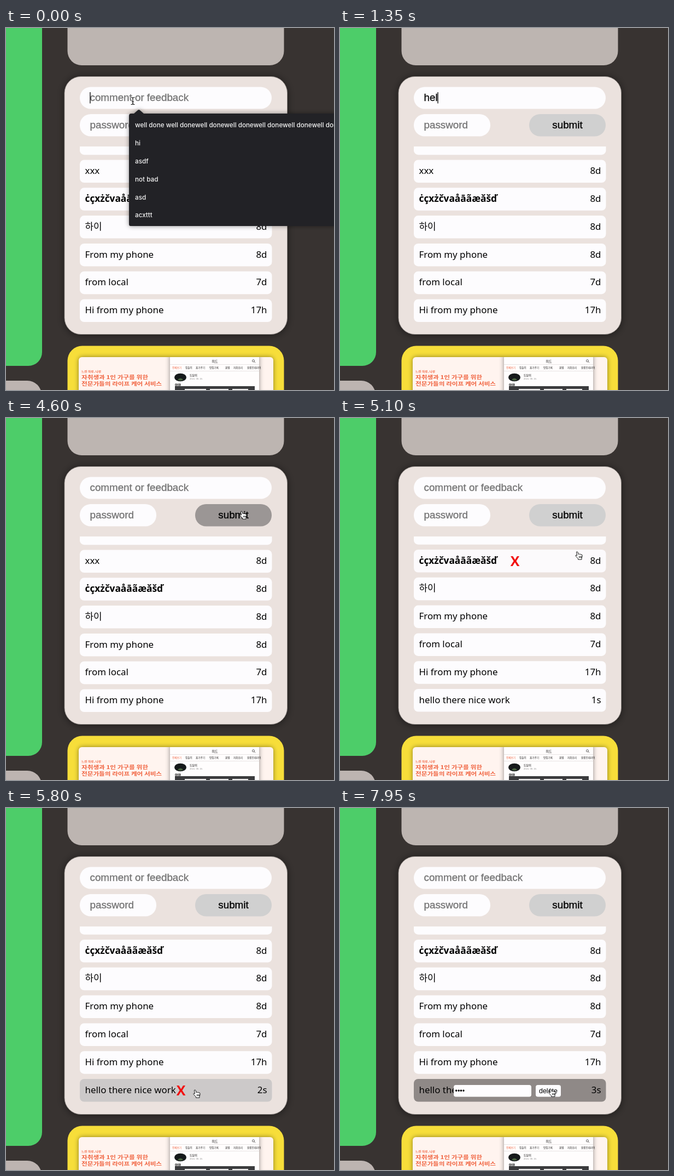
An HTML page for the animation above (8000 ms loop, 600 by 660 pixels).

```html
<!DOCTYPE html>
<html lang="en">
<head>
<meta charset="utf-8">
<title>Comment box</title>
<style>
  html, body { margin: 0; width: 100%; height: 100%; overflow: hidden; background: #383331; }
  svg { display: block; width: 100vw; height: 100vh; }
  text { white-space: pre; }
  .form { font: 18.8px "Liberation Sans", Arial, sans-serif; }
  .list { font: 16.9px "Noto Sans", "Noto Sans CJK KR", "Noto Sans CJK", sans-serif; }
  .menu { font: 500 11.7px Inter, sans-serif; fill: #f4f4f4; }
  .small { font: 12.5px "Liberation Sans", Arial, sans-serif; }
  .shot { font-family: "Noto Sans CJK KR", "Noto Sans CJK", sans-serif; }
</style>
</head>
<body>
<svg viewBox="0 0 600 660" preserveAspectRatio="none">
  <defs>
    <clipPath id="listClip"><rect x="130" y="216" width="362" height="326"/></clipPath>
    <clipPath id="shotClip"><rect x="133" y="600" width="356" height="90" rx="6"/></clipPath>
    <filter id="shadow" x="-20%" y="-20%" width="140%" height="140%">
      <feDropShadow dx="0" dy="1" stdDeviation="7" flood-color="#000" flood-opacity=".5"/>
    </filter>
    <filter id="soft" x="-20%" y="-40%" width="140%" height="180%">
      <feDropShadow dx="0" dy="0" stdDeviation="4" flood-color="#000" flood-opacity=".45"/>
    </filter>
    <path id="ibeam" d="M-3-6.500q3 0 3 2q0-2 3-2M0-4.500V4.500M-3 6.500q3 0 3-2q0 2 3 2M-1.500 1.500h3"/>
  </defs>

  <rect width="600" height="660" fill="#383331"/>
  <rect x="-60" y="-60" width="126" height="676" rx="25" fill="#4dcd69"/>
  <rect x="-60" y="643" width="125" height="80" rx="26" fill="#bdb4b1"/>
  <rect x="112.500" y="-60" width="396" height="128" rx="26" fill="#bdb5b1"/>

  <g class="shot">
    <rect x="112.500" y="579.500" width="396" height="140" rx="27" fill="#f7de3a"/>
    <rect x="133" y="600" width="356" height="90" rx="6" fill="#fff4ef" filter="url(#soft)"/>
    <g clip-path="url(#shotClip)">
      <rect x="300" y="596" width="163" height="90" fill="#fffdfd" filter="url(#soft)"/>
      <path d="M300 613.500H463M300 625.500H463" stroke="#dedada" stroke-width=".7"/>
      <g fill="#f0603c" font-weight="700" transform="translate(138 0) scale(1.34 1)">
        <text y="628" font-size="4.300">느린 하루, 나루</text>
        <text y="640.300" font-size="8.700">자취생과 1인 가구를 위한</text>
        <text y="652.300" font-size="8.700">전문가들의 라이프 케어 서비스</text>
      </g>
      <text x="382" y="609.500" font-size="6" text-anchor="middle">피드</text>
      <g fill="none" stroke="#333" stroke-width=".8"><circle cx="452.500" cy="606.800" r="2"/><path d="M454 608.300l2 2"/></g>
      <g id="tabs" font-size="4.600" font-weight="500"></g>
      <ellipse cx="319" cy="637" rx="11" ry="7.300" fill="#15191a"/>
      <path d="M314 641q5-5 10 0q-5 4-10 0" fill="#47603f"/>
      <text x="336" y="635" font-size="5" font-weight="500">도담이</text>
      <text x="336" y="640.500" font-size="4.200" fill="#888">2021. 08. 16.</text>
      <text x="309" y="652.500" font-size="6" font-weight="700">아아</text>
      <rect x="309" y="653" width="146" height="10" fill="#3b3b3d"/>
      <path d="M327 659h39M373 659h34M414 659h29" stroke="#f2f0ef" stroke-width="2"/>
    </g>
  </g>

  <rect x="107" y="88.500" width="407.500" height="470" rx="30" fill="#ebe2de" stroke="#8f8884" stroke-width=".8" filter="url(#shadow)"/>
  <g fill="#fdfcfe">
    <rect x="135" y="107.500" width="351" height="40" rx="20"/>
    <rect x="135" y="157" width="140" height="40.500" rx="20"/>
  </g>
  <rect id="submit" x="346" y="157" width="140" height="40.500" rx="20"/>
  <g class="form" stroke-width=".35">
    <text id="comment" x="153.500" y="133"></text>
    <text id="password" x="153.500" y="183"></text>
    <text x="416" y="183" text-anchor="middle" stroke="#000">submit</text>
  </g>
  <rect id="caret" width="1.300" height="20.500" fill="#000"/>

  <g clip-path="url(#listClip)"><g id="list" class="list"></g></g>

  <g id="edit" class="small">
    <rect x="208" y="505" width="142" height="21.500" rx="4" fill="#fefdff"/>
    <rect x="358" y="505" width="46" height="21.500" rx="4" fill="#fefdff"/>
    <text id="pin" x="210.500" y="520"></text>
    <text x="381" y="520" text-anchor="middle">delete</text>
    <rect id="pinCaret" y="508.500" width="1" height="14"/>
  </g>

  <g id="menu" class="menu">
    <path d="M225 160q0-4 4-4h5l7.500-6.500q1.500-1 3 0l7.500 6.500H620V361H228q-3 0-3-3z" fill="#222426" filter="url(#soft)"/>
  </g>

  <g id="beam" fill="none" stroke-linecap="round">
    <use href="#ibeam" stroke="#fff" stroke-width="2.600"/>
    <use href="#ibeam" stroke="#111" stroke-width="1.200"/>
  </g>
  <path id="arrow" d="M-4-7V6l3-2.800 2 4.800 2.300-1-2-4.600H5.500z" fill="#111" stroke="#fff"/>
  <path id="hand" d="M-4.500-6.500q1.700-1.500 2.700.7L-.8-2.200q1-1.300 2.400-.1 1.300-.8 2.200.5 1.800-.6 2.200 1.100.5 3-1 5.200v2.700H-1.500V5.500Q-3.500 3.500-6.300.3q.4-2 2.800-.3zM.6 1.200v3M2.600 1.200v3M4.400 1.200v3" fill="#fff" stroke="#111" stroke-width="1" stroke-linejoin="round"/>
</svg>
<script>
const LOOP = 8000, PITCH = 50.8, ROW_H = 41.5, TOP = 240.5, FADE = 600;
const START = 1070, RESUME = 2850, TAB = 3420, CLEAR = 4450, POSTED = 4700, EDIT = 6550;
const MESSAGE = 'hello there nice work';
const WHITE = [253, 252, 254], GREY = [208, 208, 208], DARK = [143, 137, 135];
const $ = id => document.getElementById(id);

function add(parent, tag, attrs, text) {
  const el = document.createElementNS('http://www.w3.org/2000/svg', tag);
  set(el, attrs);
  if (text) el.textContent = text;
  parent.appendChild(el);
  return el;
}
function set(el, attrs) { for (const k in attrs) el.setAttribute(k, attrs[k]); }
const show = (el, on) => { el.style.display = on ? '' : 'none'; };
const write = (el, s) => { if (el.textContent !== s) el.textContent = s; };
const clamp = (v, lo, hi) => Math.min(hi, Math.max(lo, v));
const mix = (a, b, k) => `rgb(${a.map((v, i) => Math.round(v + (b[i] - v) * k))})`;

const rows = [
  ['aaaa', '8d'], ['xxx', '8d'], ['ċçxżčvaåāãæǎšď', '8d'], ['하이', '8d'],
  ['From my phone', '8d'], ['from local', '7d'], ['Hi from my phone', '17h'], [MESSAGE, '1s']
].map(([text, age], i) => {
  const g = add($('list'), 'g', { transform: `translate(135 ${TOP + (i - 1) * PITCH})` });
  const box = add(g, 'rect', { width: 351.5, height: ROW_H, rx: 8 });
  const label = add(g, 'text', { x: 9.5, y: 25.7 }, text);
  if (i === 2) set(label, { 'font-size': 17.3, 'font-weight': 600 });
  const time = add(g, 'text', { x: 342.5, y: 25.7, 'text-anchor': 'end' }, age);
  const cross = add(g, 'text', { x: 185, y: 30.2, 'text-anchor': 'middle', fill: '#f20d0d', 'font-size': 25, 'font-weight': 600 }, 'X');
  return { g, box, time, cross };
});

['well done ' + 'well done'.repeat(7), 'hi', 'asdf', 'not bad', 'asd', 'acxttt']
  .forEach((s, i) => add($('menu'), 'text', { x: 236, y: 180.7 + i * 32.95 }, s));

[[304, '전체보기'], [328, '집들이'], [347, '홈가꾸기'], [372, '맛집기록'], [401, '홈템'], [416, '자취요리'], [441, '원룸인테리어']]
  .forEach(([x, s], i) => add($('tabs'), 'text', { x, y: 621, fill: i ? '#222' : '#f0603c' }, s));

// Pointer path: time, x, y
const path = [
  [0, 232, 133], [4100, 232, 133], [4380, 434, 177], [4850, 434, 177], [5350, 440, 324],
  [5460, 415, 451], [5550, 394, 475], [5645, 372, 502], [5800, 349, 521], [6150, 327, 522],
  [6220, 327, 522], [6350, 314, 518], [6500, 314, 518], [6700, 310, 516], [7600, 310, 516], [7900, 388, 519]
];
function pointer(t) {
  let i = 1;
  while (i < path.length - 1 && path[i][0] < t) i++;
  const [t0, x0, y0] = path[i - 1], [t1, x1, y1] = path[i];
  const k = clamp((t - t0) / (t1 - t0), 0, 1);
  return [x0 + (x1 - x0) * k, y0 + (y1 - y0) * k];
}
const scroll = t => t < POSTED ? 0 : PITCH + 0.5;

// What lies under the pointer: a row index, a control, or nothing
function target(t) {
  const [x, cy] = pointer(t), y = cy - 7;
  if (x < 135 || x > 487) return '';
  if (y > 107 && y < 148) return 'input';
  if (y > 157 && y < 198) return x > 346 ? 'submit' : x < 275 ? 'input' : '';
  if (y < 216) return '';
  const d = y - TOP + PITCH + scroll(t), i = Math.floor(d / PITCH);
  return i < rows.length && d - i * PITCH < ROW_H ? i : '';
}
// CSS "ease"
function ease(p) {
  let lo = 0, hi = 1;
  for (let i = 0; i < 16; i++) {
    const u = (lo + hi) / 2, v = 1 - u;
    if (0.75 * v * v * u + 0.75 * v * u * u + u * u * u < p) lo = u; else hi = u;
  }
  const v = 1 - lo;
  return 0.3 * v * v * lo + 3 * v * lo * lo + lo ** 3;
}
function hoverLevel(t, over) {
  let age = 0;
  while (age < FADE && target(t - age) === over) age += 5;
  return ease(age / FADE);
}

// Keys pressed by time t, and the moment of the last one
function keys(t, from, step, max) {
  const n = clamp(Math.floor((t - from) / step) + 1, 0, max);
  return [n, n ? from + (n - 1) * step : 0];
}
function field(el, value, hint) {
  write(el, value || hint);
  const ink = value ? '#111' : '#757575';
  set(el, { fill: ink, stroke: ink });
  return value ? el.getComputedTextLength() : 0;
}
const blink = (t, last) => (t - last) % 1000 < 500;

function draw(t) {
  const live = t < CLEAR, inPass = t >= TAB;
  const [n1, k1] = keys(t, START, 120, 14), [n2, k2] = keys(t, RESUME, 80, MESSAGE.length - 14);
  const [dots, k3] = keys(t, 3640, 110, 4);
  const w1 = field($('comment'), live ? MESSAGE.slice(0, n1 + n2) : '', 'comment or feedback');
  const w2 = field($('password'), live ? '•'.repeat(dots) : '', 'password');
  show($('caret'), live && blink(t, Math.max(k1, k2, k3, inPass ? TAB : 0)));
  set($('caret'), { x: 153.3 + (inPass ? w2 : w1), y: inPass ? 167 : 117 });
  show($('menu'), t < START);

  const over = target(t), level = hoverLevel(t, over), editing = t >= EDIT;
  set($('submit'), { fill: mix(GREY, DARK, over === 'submit' ? level : 0) });
  set($('list'), { transform: `translate(0 ${-scroll(t)})` });
  rows.forEach((r, i) => {
    set(r.box, { fill: mix(WHITE, DARK, over === i ? level : 0) });
    show(r.cross, over === i && !editing);
  });
  show(rows[7].g, t >= POSTED);
  write(rows[7].time, t < 5650 ? '1s' : t < EDIT ? '2s' : '3s');

  show($('edit'), editing);
  const [pins, k4] = keys(t, 7080, 90, 4);
  write($('pin'), '•'.repeat(pins));
  show($('pinCaret'), t >= 7000 && t < 7600 && blink(t, k4 || 7000));
  set($('pinCaret'), { x: 210.5 + pins * 4.4 });

  const [x, y] = pointer(t);
  const visible = t < START || (t >= 4100 && t < 7000) || t >= 7600;
  const kind = over === 'input' || (editing && x < 350) ? 'beam' : over === '' ? 'arrow' : 'hand';
  for (const id of ['beam', 'arrow', 'hand']) {
    show($(id), visible && id === kind);
    set($(id), { transform: `translate(${x} ${y})` });
  }
}

const start = performance.now();
function tick() {
  draw((performance.now() - start) % LOOP);
  requestAnimationFrame(tick);
}
tick();
</script>
</body>
</html>
```
